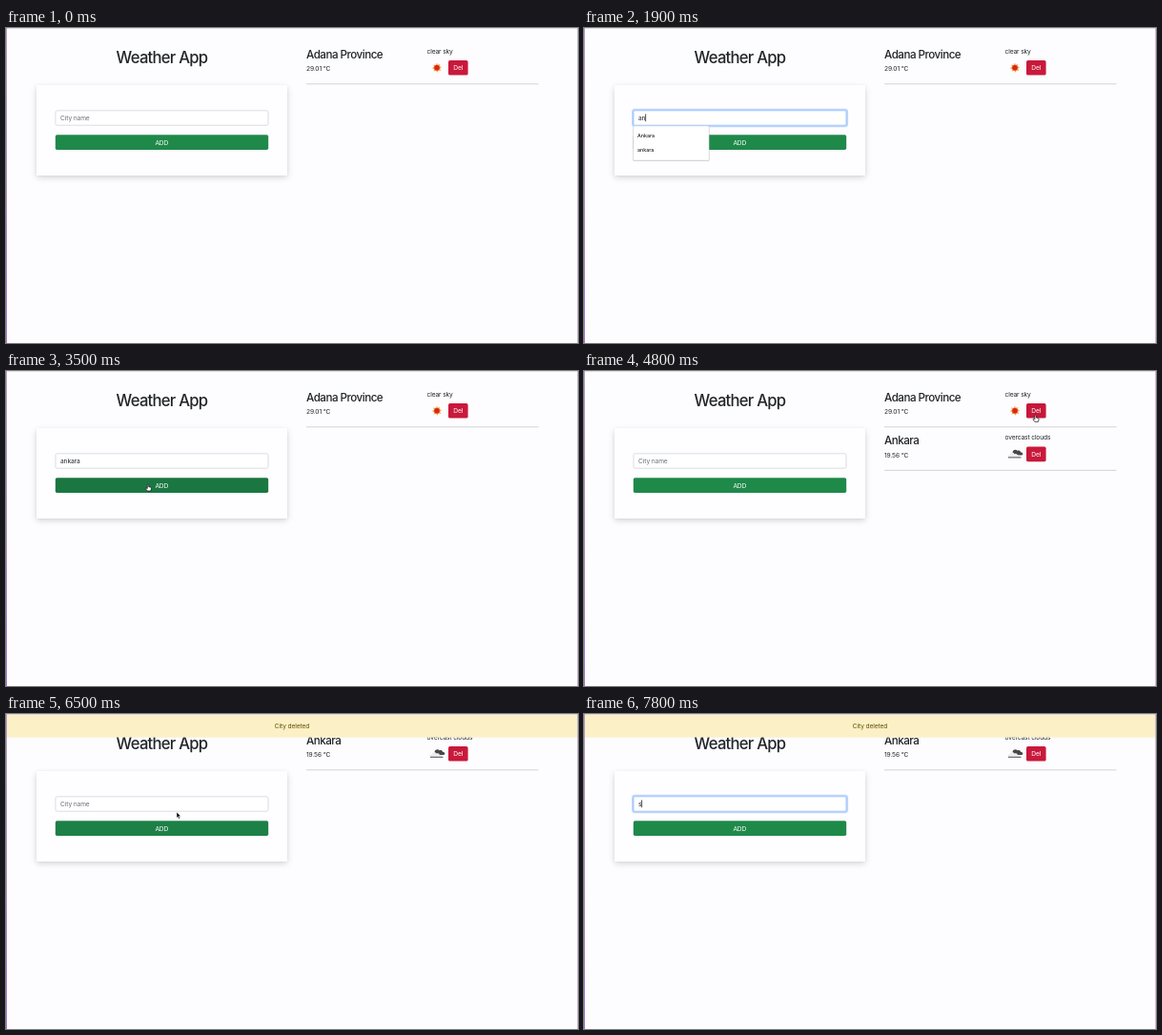
These frames come from a looping animation (600 by 331 pixels, 8 s). An HTML page:

```html
<!DOCTYPE html>
<html lang="en">
<head>
<meta charset="utf-8">
<title>Weather App</title>
<style>
html, body { margin: 0; width: 100%; height: 100%; overflow: hidden; background: #fdfcfe; }
.card { position: absolute; left: 32px; top: 60px; width: 263px; height: 94.5px;
  background: #fefdff; box-shadow: 0 3.3px 6.7px rgba(0,0,0,.17), 0 0 3px rgba(0,0,0,.04); }
svg { position: absolute; left: 0; top: 0; display: block; }
text { font: 400 6.67px Inter, "Open Sans", sans-serif; letter-spacing: -.02em; fill: #212529; white-space: pre; }
.h1 { font-size: 16.67px; font-weight: 500; letter-spacing: -.045em; }
.h3 { font-size: 11.67px; font-weight: 500; letter-spacing: -.045em; }
.mid { text-anchor: middle; }
.white { fill: #fff; }
.option { font-size: 5.42px; font-weight: 500; letter-spacing: -.01em; }
.status { font-size: 4.9px; fill: #3c3c40; }
</style>
</head>
<body>
<div class="card"></div>
<svg width="600" height="331" viewBox="0 0 600 331">
  <defs>
    <linearGradient id="edge" x2="0" y2="1">
      <stop stop-color="#b79ac6"/><stop offset="1" stop-color="#a877c0"/>
    </linearGradient>
    <g id="sun">
      <path d="M0-5 1-3 3.2-3.8 2.8-1.6 5.2-.6 3.2.8 4.2 3.2 1.8 2.8.4 5-.9 3-3.4 3.8-2.8 1.5-5.2.4-3-1-3.8-3.2-1.4-2.8Z" fill="#f2a64a"/>
      <circle r="2.8" fill="#d9261c"/>
    </g>
    <g id="clouds">
      <path d="M-2.5-1.5C-2.5-4.5 1-5.6 2.6-3.6 5-4.6 6.3-3 6-1.8 8.6-2.2 9.2 1 7 1.2H0Z" fill="#47474a"/>
      <path d="M-6.5 3.6C-8.6 2.8-7.6.3-5.4.8-5-2-1.4-2.4-.5-.2 1.6-1 3 .2 2.8 1.4 5.8.8 6 3.4 4.4 3.6Z" fill="#ececef"/>
      <path d="M-7 3.5H6.5" stroke="#3f3f42" stroke-width=".9"/>
    </g>
  </defs>

  <text class="h1 mid" x="163.5" y="36.6">Weather App</text>
  <g id="rows"></g>

  <rect id="ring" x="51.1" y="85.8" width="225" height="17.4" rx="2.4" fill="none" stroke="#bcd5fb" stroke-width="2"/>
  <rect id="field" x="52" y="86.8" width="223" height="15.4" rx="1.6" fill="#fff" stroke-width=".7"/>
  <text id="value" x="57" y="96.9"></text>
  <rect id="caret" y="90.4" width=".8" height="7.8" fill="#222"/>

  <rect id="add" x="51.8" y="112.2" width="223.4" height="15.8" rx="1.7"/>
  <text class="mid white" x="163.3" y="122.5">ADD</text>

  <g id="list">
    <rect id="listShade" x="51.2" y="103.2" width="80.4" rx="1.5" fill="#000" opacity=".16"/>
    <rect id="listBox" x="51.7" y="103" width="79.4" rx="1.3" fill="#fff" stroke="#d5d5d8" stroke-width=".5"/>
    <g id="options"></g>
  </g>

  <g id="banner">
    <rect width="600" height="24.6" fill="#fbf0c6"/>
    <text class="mid" x="300" y="15.1" style="fill:#664d03">City deleted</text>
  </g>
  <g id="status">
    <path d="M0 326H61.5Q63 326 63 327.5V331H0Z" fill="#d6d5d8"/>
    <text class="status" x="2" y="332.4">127.0.0.1:8000/delete/31</text>
  </g>
  <rect width="600" height=".9" fill="#dddce0"/>
  <rect width="1" height="331" fill="url(#edge)"/>
  <rect x="599.2" width=".8" height="331" fill="#c3b4cb"/>

  <g id="cursor">
    <path id="arrow" d="M0 0V6.2L1.4 4.9 2.4 7.2 3.5 6.7 2.5 4.5H4.4Z" fill="#000" stroke="#fff" stroke-width=".5"/>
    <path id="beam" d="M-1.4-3.4Q0-3.4 0-2.6Q0-3.4 1.4-3.4M0-2.8V2.8M-1.4 3.4Q0 3.4 0 2.6Q0 3.4 1.4 3.4" fill="none" stroke="#222" stroke-width=".8"/>
    <path id="hand" d="M-.7.5Q0-.4.7.5V2.7L2.9 3.2Q3.6 3.4 3.5 4.2L2.9 7H-.8L-2.7 4.5Q-2.4 3.5-.7 4.5Z" fill="#fff" stroke="#111" stroke-width=".7"/>
  </g>
</svg>
<script>
const LOOP = 8000, TICK = 100;
const $ = id => document.getElementById(id);

const recent = ["adana", "Torvin Balek", "bolu", "LTRune", "adna", "Bolu"];
const matches = ["Ankara", "ankara"];
const adana = ["Adana Province", "29.01 °C", "clear sky", "sun"];
const ankara = ["Ankara", "19.56 °C", "overcast clouds", "clouds"];

// Each track lists [start time, value]; a value holds until the next one.
const tracks = {
  value: [[0, ""], [1900, "an"], [2100, "ank"], [2200, "anka"], [2400, "ankar"], [2500, "ankara"], [3800, ""], [7700, "s"]],
  caret: [[0, 0], [1100, 1], [1600, 0], [1900, 1], [3300, 0], [6600, 1], [7200, 0], [7700, 1]],
  ring: [[0, 0], [1100, 0], [1200, .6], [1300, 1], [3300, .7], [3400, .3], [3500, 0], [6700, .6], [6800, 1]],
  list: [[0, []], [1100, recent], [1900, matches], [3300, []], [6600, recent], [7700, []]],
  rows: [[0, [adana]], [3800, [adana, ankara]], [5300, [ankara]]],
  banner: [[0, 0], [5300, 1]],
  status: [[0, 0], [5100, 1], [5800, 0]],
  add: [[0, 0], [600, 1], [700, .4], [800, 0], [3000, .5], [3100, 1], [4400, .4], [4500, 0], [6200, .5], [6300, 1], [6500, .5], [6600, 0]],
  del: [[0, 0], [400, 1], [500, 0], [4800, .3], [4900, .8], [5000, 1], [5800, 0]]
};

// Pointer: time, shape, x, y.
const pointer = [
  [0, ""], [300, "arrow", 474, 27], [400, "hand", 468, 41], [500, "arrow", 330, 95],
  [600, "hand", 200, 116], [700, "arrow", 130, 106], [800, "beam", 108, 95.5],
  [1200, "beam", 117, 97], [1300, "beam", 124, 98], [1900, ""],
  [2800, "beam", 124, 98], [2900, "arrow", 134, 106], [3000, "hand", 142, 113],
  [3100, "hand", 147, 117], [3200, "hand", 149, 119],
  [4200, "hand", 158, 117], [4300, "hand", 185, 113], [4400, "arrow", 240, 101],
  [4500, "arrow", 320, 83], [4600, "arrow", 400, 66], [4700, "arrow", 450, 54],
  [4800, "hand", 473.6, 46.3], [4900, "hand", 474.5, 43], [5000, "hand", 475.3, 40.5],
  [5700, "hand", 472, 44], [5800, "arrow", 455, 56], [5900, "arrow", 400, 74],
  [6000, "arrow", 320, 95], [6100, "arrow", 250, 106], [6200, "hand", 205, 114],
  [6300, "hand", 184, 114], [6400, "hand", 181, 112], [6500, "arrow", 179, 103],
  [6600, "beam", 178, 97], [7800, ""]
];

const at = (track, t) => track.findLast(step => step[0] <= t);
const show = (id, on) => $(id).setAttribute("visibility", on ? "visible" : "hidden");
const mix = (a, b, k) => `rgb(${a.map((v, i) => Math.round(v + (b[i] - v) * k))})`;

function rowMarkup([city, temp, sky, icon], i) {
  return `<g transform="translate(0 ${i * 45.6})">
    <text class="h3" x="315" y="31.7">${city}</text>
    <text x="315" y="45">${temp}</text>
    <text x="441.5" y="26.5">${sky}</text>
    <use href="#${icon}" x="452" y="41.8"/>
    <rect class="del" x="464" y="34" width="20.6" height="15.6" rx="1.7" fill="#c9193b"/>
    <text class="mid white" x="474.3" y="44.3">Del</text>
    <path d="M315 58.8H558.5" stroke="#cfced2" stroke-width=".9"/>
  </g>`;
}

function fillList(items) {
  show("list", items.length);
  const height = items.length * 15 + 6;
  $("listBox").setAttribute("height", height);
  $("listShade").setAttribute("height", height + .7);
  $("options").innerHTML = items.map((s, i) =>
    `<text class="option" x="56" y="${115.4 + i * 14.9}">${s}</text>`).join("");
}

function draw(t) {
  const now = {};
  for (const key in tracks) now[key] = at(tracks[key], t)[1];

  $("rows").innerHTML = now.rows.map(rowMarkup).join("");
  document.querySelector(".del").setAttribute("fill", mix([201, 25, 59], [187, 21, 53], now.del));
  $("add").setAttribute("fill", mix([31, 137, 74], [26, 119, 66], now.add));

  $("ring").setAttribute("opacity", now.ring);
  $("field").setAttribute("stroke", mix([203, 206, 212], [134, 183, 254], now.ring));
  const value = $("value");
  value.textContent = now.value || "City name";
  value.style.fill = now.value ? "#212529" : "#6c7076";
  $("caret").setAttribute("x", 56.9 + (now.value ? value.getComputedTextLength() : 0));
  show("caret", now.caret);

  fillList(now.list);
  show("banner", now.banner);
  show("status", now.status);

  const [, shape, x = 0, y = 0] = at(pointer, t);
  for (const id of ["arrow", "beam", "hand"]) show(id, id === shape);
  $("cursor").setAttribute("transform", `translate(${x} ${y})`);
}

const start = performance.now();
let last = -1;
function frame() {
  const t = Math.floor((performance.now() - start) % LOOP / TICK) * TICK;
  if (t !== last) draw(last = t);
  requestAnimationFrame(frame);
}
frame();
</script>
</body>
</html>
```
